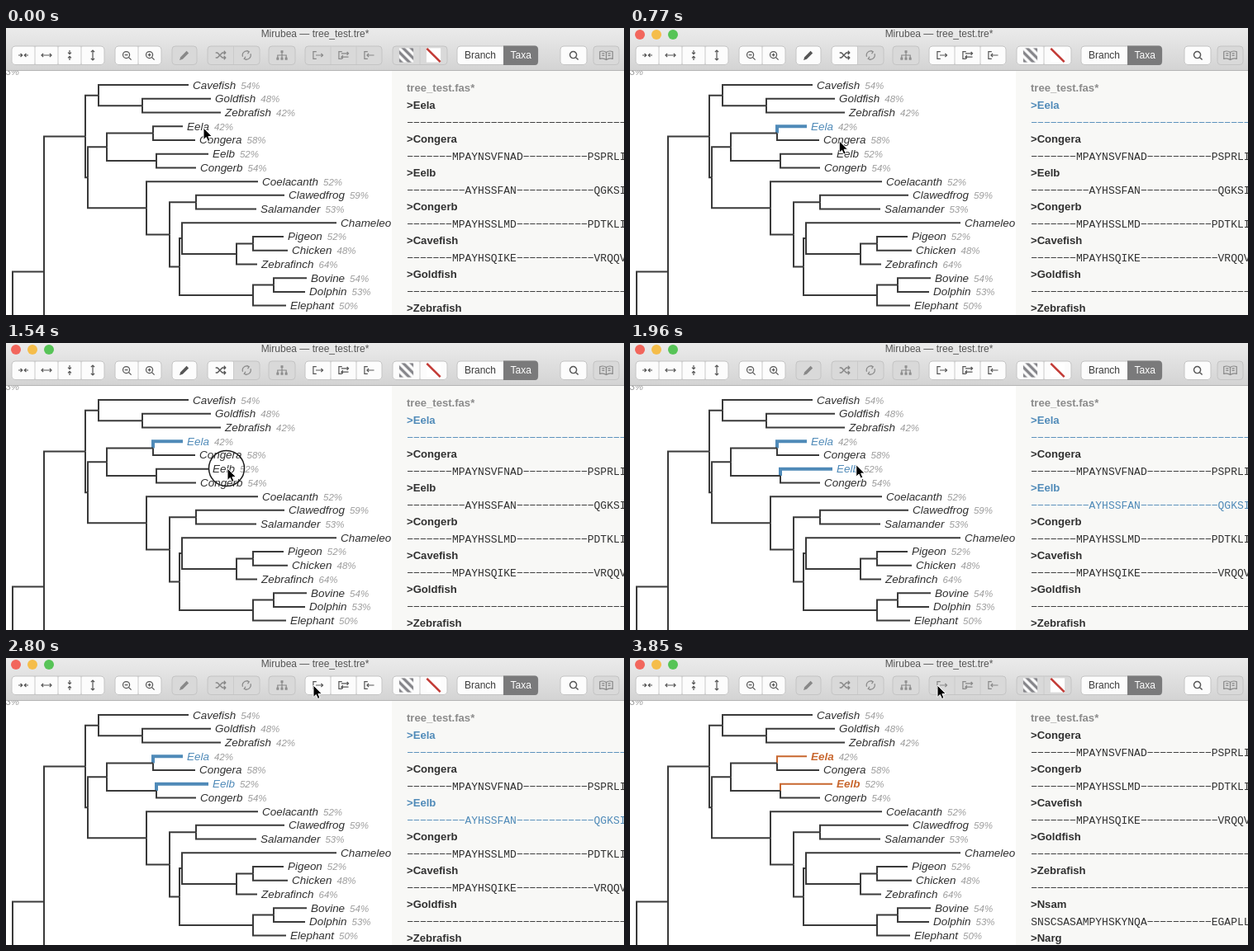
An HTML page for the animation above (4.06 s loop, 748 px wide and 348 px high).

```html
<!DOCTYPE html>
<html lang="en">
<head>
<meta charset="utf-8">
<title>Tree viewer</title>
<style>
html, body { margin: 0; width: 100%; height: 100%; overflow: hidden; background: #fff; }
svg { display: block; font-family: "Liberation Sans", Arial, sans-serif; }
text { white-space: pre; }
.name { font-size: 13.45px; font-style: italic; }
.pct { font-size: 11.5px; font-style: italic; font-weight: 400; fill: #9b9b9b; }
.head { font-size: 13.1px; font-weight: 700; }
.seq { font: 13px "Liberation Mono", "Courier New", monospace; }
.ui { font-size: 12px; }
.icon { fill: none; stroke-width: 1.4; }
</style>
</head>
<body>
<svg width="748" height="348" viewBox="0 0 748 348">
  <defs>
    <linearGradient id="bar" x2="0" y2="1">
      <stop stop-color="#ebebeb"/><stop offset="1" stop-color="#d3d3d3"/>
    </linearGradient>
    <pattern id="hatch" width="8" height="8" patternUnits="userSpaceOnUse" patternTransform="rotate(45)">
      <rect width="8" height="8" fill="#fff"/><rect y="2" width="8" height="4" fill="#85858a"/>
    </pattern>
    <clipPath id="left"><rect y="52" width="466" height="296"/></clipPath>
  </defs>
  <g id="view"></g>
  <g id="lights">
    <circle cx="12" cy="8" r="6" fill="#f2665c"/>
    <circle cx="32" cy="8" r="6" fill="#f5bd4a"/>
    <circle cx="52" cy="8" r="6" fill="#57c457"/>
  </g>
  <circle id="ring" r="21.5" fill="none" stroke="#1c1c1c" stroke-width="1.5"/>
  <path id="cursor" d="M0 0V14.5L3.3 11.5L5.5 16.5L8 15.4L5.9 10.5H10.4Z" fill="#000" stroke="#fff"/>
</svg>
<script>
const LOOP = 4060, STEP = 70;
const INK = '#303030', LINE = '#3a3a3a', BLUE = '#4f8ab8', ORANGE = '#c8672f';
const $ = id => document.getElementById(id);

// Inner node: [x, child, child]; leaf: [line end, name, support]
const tree = [96,
  [112, [221, 'Cavefish', 54],
    [165, [248, 'Goldfish', 48], [260, 'Zebrafish', 42]]],
  [99,
    [122,
      [178, [214, 'Eela', 42], [229, 'Congera', 58]],
      [182, [245, 'Eelb', 52], [230, 'Congerb', 54]]],
    [170, [305, 'Coelacanth', 52],
      [198,
        [230, [337, 'Clawedfrog', 59], [303, 'Salamander', 53]],
        [210,
          [213, [400, 'Chameleon', 61],
            [279, [299, [336, 'Pigeon', 52], [341, 'Chicken', 48]], [304, 'Zebrafinch', 64]]],
          [299, [324, [364, 'Bovine', 54], [362, 'Dolphin', 53]], [339, 'Elephant', 50]]]]]]];

// The minus sign gives the wide alignment dash
const gap = n => '\u2212'.repeat(n);
const taxa = [
  ['Eela', gap(34)],
  ['Congera', gap(7) + 'MPAYNSVFNAD' + gap(10) + 'PSPRLI'],
  ['Eelb', gap(9) + 'AYHSSFAN' + gap(12) + 'QGKSI'],
  ['Congerb', gap(7) + 'MPAYHSSLMD' + gap(11) + 'PDTKLI'],
  ['Cavefish', gap(7) + 'MPAYHSQIKE' + gap(12) + 'VRQQV'],
  ['Goldfish', gap(34)],
  ['Zebrafish', gap(34)],
  ['Nsam', 'SNSCSASAMPYHSKYNQA' + gap(10) + 'EGAPLL'],
  ['Narg', gap(34)]
];

const text = (x, y, s, cls, fill, more = '') =>
  `<text x="${x}" y="${y}" class="${cls}" fill="${fill}" ${more}>${s.replace(/^>/, '&gt;')}</text>`;
const line = (d, stroke = LINE, width = 2) =>
  `<path d="${d}" fill="none" stroke="${stroke}" stroke-width="${width}"/>`;
const box = (x, y, w, h, fill, more = '') =>
  `<rect x="${x}" y="${y}" width="${w}" height="${h}" fill="${fill}" ${more}/>`;

// Stages: 0 nothing picked, 1 Eela picked, 2 Eela and Eelb picked, 3 both removed
const picked = (name, stage) => name === 'Eela' ? stage > 0 : name === 'Eelb' && stage > 1;

function drawTree(stage) {
  let out = '', row = 0;
  const mark = stage > 2 ? ORANGE : BLUE;
  function walk(node) {
    const [x, a, b] = node;
    if (typeof a === 'string') {
      const y = 69.1 + 16.72 * row++, on = picked(a, stage);
      const label = `${a}<tspan class="pct" dx="6">${b}%</tspan>`;
      out += text(x + 5, y + 4.4, label, 'name', on ? mark : INK, on && stage > 2 ? 'font-weight="700"' : '');
      return y;
    }
    const kids = [a, b], ys = kids.map(walk), mid = (ys[0] + ys[1]) / 2;
    kids.forEach((kid, i) => {
      const on = picked(kid[1], stage);
      out += line(`M${x} ${mid}V${ys[i]}H${kid[0]}`, on ? mark : LINE, on && stage < 3 ? 4 : 2);
    });
    return mid;
  }
  const top = walk(tree);
  out += line(`M96 ${top}H46V350M46 295.5H8V350`) + text(-7, 57, '53%', 'pct', '#9b9b9b');
  return `<g clip-path="url(#left)">${out}</g>`;
}

function drawTaxa(stage) {
  const list = stage > 2 ? taxa.filter(t => !picked(t[0], stage)) : taxa;
  let out = box(467, 52, 281, 296, '#f8f8f6') + text(485, 77, 'tree_test.fas*', 'head', '#8b8b8b');
  list.slice(0, 7).forEach(([name, seq], i) => {
    const fill = picked(name, stage) ? BLUE : INK, y = 98.2 + 41 * i;
    out += text(485, y, '>' + name, 'head', fill) + text(485.3, y + 20.8, seq, 'seq', fill);
  });
  return out;
}

// Icons are centred on 0,0
const lens = 'M3 3L6.5 6.5M4.2-.5A4.7 4.7 0 1 1-5.2-.5A4.7 4.7 0 1 1 4.2-.5';
const door = 'M-2-5H-6.5V5H-2';
const inward = 'M-7 0H-1.5M-4-2.3L-1.5 0L-4 2.3M7 0H1.5M4-2.3L1.5 0L4 2.3';
const outward = 'M-7 0H7M-4.5-2.5L-7 0L-4.5 2.5M4.5-2.5L7 0L4.5 2.5';
const upright = 'transform="rotate(90)"';
const stroke = (d, more = '') => c => `<path d="${d}" stroke="${c}" ${more}/>`;
const icons = {
  squeezeX: stroke(inward), stretchX: stroke(outward),
  squeezeY: stroke(inward, upright), stretchY: stroke(outward, upright),
  zoomOut: stroke(lens + 'M-2.7-.5H1.7'),
  zoomIn: stroke(lens + 'M-2.7-.5H1.7M-.5-2.7V1.7'),
  search: stroke(lens, 'stroke-width="1.7"'),
  pencil: c => `<path d="M-7 7L-5.5 2.5L3-6L6-3L-2.5 5.5Z" fill="${c}"/>`,
  shuffle: stroke('M-7-3.5H-4.5L2.5 3.5H7M-7 3.5H-4.5L2.5-3.5H7M4.7-6L7-3.5L4.7-1M4.7 1L7 3.5L4.7 6', 'stroke-width="1.6"'),
  rotate: stroke('M-5.5 2A6 6 0 0 1 3-5.2M5.5-2A6 6 0 0 1-3 5.2M0-6.5L3.5-5L1.5-2M0 6.5L-3.5 5L-1.5 2'),
  tree: stroke('M0-3V3.5M-6 3.5V0H6V3.5M-1-6H1V-4H-1ZM-7 4H-5V6H-7ZM-1 4H1V6H-1ZM5 4H7V6H5Z'),
  extract: stroke(door + 'M-3 0H7M4.5-2.5L7 0L4.5 2.5'),
  swap: stroke(door + 'M-3-2.5H7M4.8-4.7L7-2.5L4.8-.3M7 2.5H-3M-.8.3L-3 2.5L-.8 4.7'),
  restore: stroke(door + 'M7 0H-3M-.5-2.5L-3 0L-.5 2.5'),
  hatch: () => box(-10, -10, 20, 20, 'url(#hatch)'),
  clear: () => box(-10, -10, 20, 20, '#fff') + line('M-9.5-9.5L9.5 9.5', '#c23a35', 3),
  book: stroke('M0-4V6.5M0-4Q-4-7-9-5V5Q-4 3.5 0 6.5Q4 3.5 9 5V-5Q4-7 0-4M-6-2.5H-2.5M-6 .5H-2.5M2.5-2.5H6M2.5.5H6')
};

// [left, right, icon names]
const groups = [
  [7, 119, 'squeezeX stretchX squeezeY stretchY'], [132, 188, 'zoomOut zoomIn'], [201, 231, 'pencil'],
  [244, 307, 'shuffle rotate'], [318, 350, 'tree'], [362, 455, 'extract swap restore'],
  [468, 534, 'hatch clear'], [671, 703, 'search'], [711, 742, 'book']
];
const always = 'squeezeX stretchX squeezeY stretchY zoomOut zoomIn search';
const withPick = always + ' extract swap restore hatch clear';
const enabled = [always, withPick + ' pencil shuffle', withPick, always].map(s => s.split(' '));

function drawBar(stage) {
  let out = box(0, 0, 748, 52, 'url(#bar)') + box(0, 51, 748, 1, '#b5b5b5');
  out += text(374, 11, 'Mirubea — tree_test.tre*', 'ui', '#555', 'text-anchor="middle"');
  const frame = (x, w) => box(x, 22, w, 22.5, 'none', 'rx="4" stroke="#c4c4c4"');
  for (const [x, end, names] of groups) {
    const list = names.split(' '), w = (end - x) / list.length;
    list.forEach((name, i) => {
      const on = enabled[stage].includes(name), left = x + i * w;
      out += box(left, 22, w, 22.5, on ? '#fcfcfc' : '#d9d9d9', 'rx="3"');
      if (i) out += line(`M${left} 22V44.5`, '#cacaca', 1);
      out += `<g class="icon" transform="translate(${left + w / 2} 33) scale(.86)">${icons[name](on ? '#555' : '#888')}</g>`;
    });
    out += frame(x, end - x);
  }
  return out + box(546, 22, 98, 22.5, '#fcfcfc', 'rx="4"') + frame(546, 98) +
    '<path d="M602 21.5H640Q644 21.5 644 26V40.5Q644 45 640 45H602Z" fill="#7a7a7b"/>' +
    text(555, 37, 'Branch', 'ui', '#3a3a3a') + text(610.5, 37, 'Taxa', 'ui', '#fff');
}

// Pointer moves along quadratic curves: start, end, from, control, to
const moves = [
  [510, 1030, [239, 121], [253, 137], [268, 152]],
  [1890, 2500, [268, 152], [348, 91], [372, 33]]
];
const clicks = [[70, 210], [1470, 1610], [3010, 3220]];
const changes = [210, 1610, 3220];

function pointer(t) {
  const [start, end, a, b, c] = moves[t < moves[1][0] ? 0 : 1];
  const u = Math.min(1, Math.max(0, (t - start) / (end - start))), s = u * u * (3 - 2 * u);
  return [0, 1].map(i => (1 - s) ** 2 * a[i] + 2 * s * (1 - s) * b[i] + s * s * c[i]);
}

const show = (id, on) => $(id).style.display = on ? '' : 'none';
let shown = -1;
function render(now) {
  const t = Math.floor(now % LOOP / STEP) * STEP;
  const stage = changes.filter(c => t >= c).length;
  if (stage !== shown) {
    $('view').innerHTML = box(0, 0, 748, 348, '#fff') + drawTree(stage) + drawTaxa(stage) + drawBar(stage);
    shown = stage;
  }
  const [x, y] = pointer(t);
  $('cursor').setAttribute('transform', `translate(${x} ${y})`);
  $('ring').setAttribute('transform', `translate(${x - 1} ${y})`);
  show('ring', clicks.some(([a, b]) => t >= a && t < b));
  show('lights', t >= clicks[0][0]); // the first click activates the window
}

let begin;
function tick(now) {
  begin ??= now;
  render(now - begin);
  requestAnimationFrame(tick);
}
render(0);
requestAnimationFrame(tick);
</script>
</body>
</html>
```
